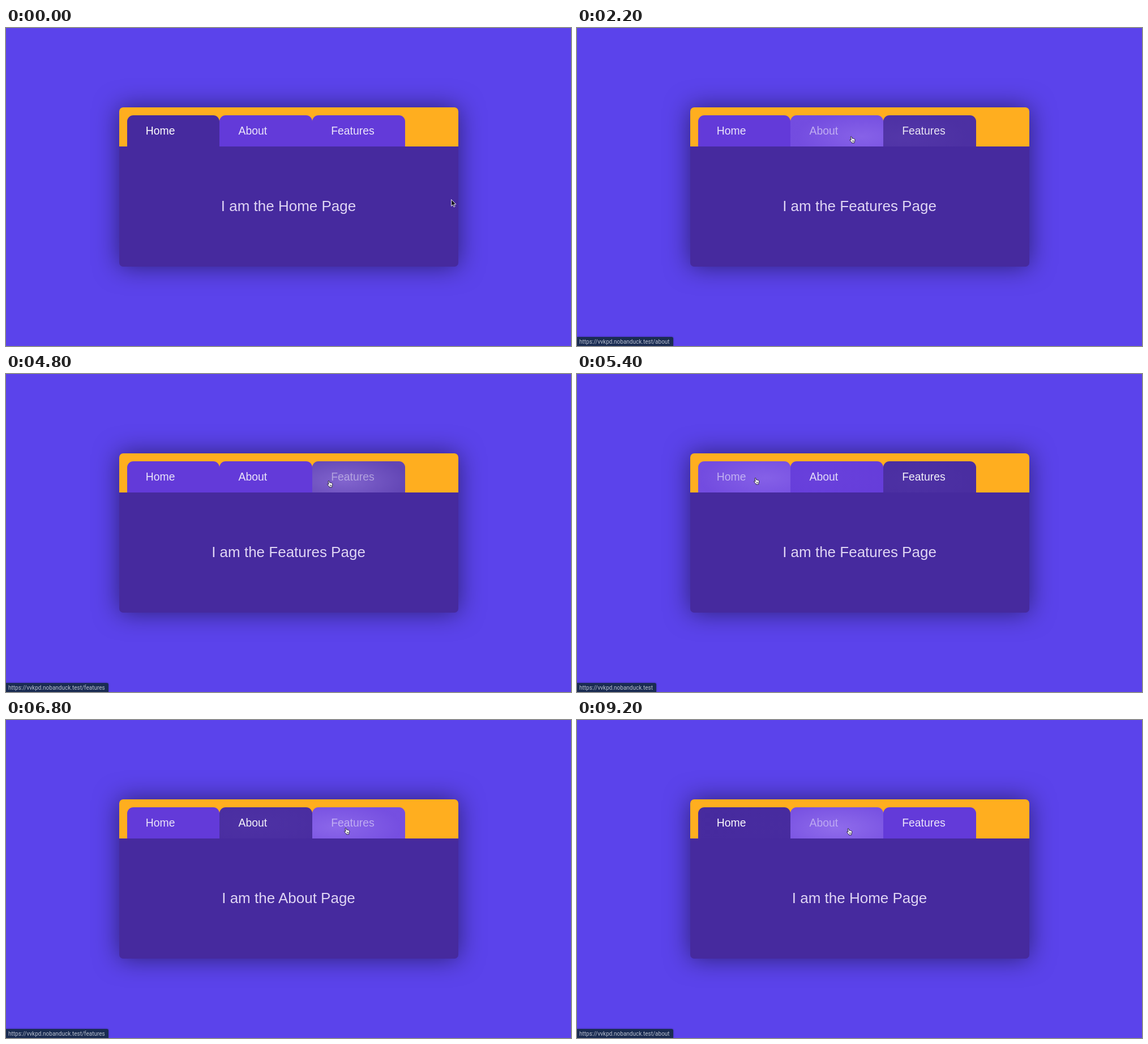
An HTML page for the animation above (10 s loop, 998 by 561 pixels).

```html
<!DOCTYPE html>
<html lang="en">
<head>
<meta charset="utf-8">
<title>Tabs</title>
<style>
  html, body { margin: 0; width: 100%; height: 100%; overflow: hidden; background: #5b43eb; }
  body { position: relative; font-family: "Liberation Sans", Arial, sans-serif; cursor: default; }
  .card {
    position: absolute; left: 199.5px; top: 140px; width: 599px; height: 280.5px;
    border-radius: 7px; background: #462a9e; box-shadow: 0 0 44px rgba(0, 0, 0, .5);
  }
  .bar { height: 68.7px; border-radius: 7px 7px 0 0; background: #ffae1f; }
  .tab {
    position: absolute; top: 14px; width: 163.7px; height: 54.7px;
    border-radius: 11px 11px 0 0; overflow: hidden; background: #633ad9;
  }
  .tab.on { background: #462a9e; }
  .glow { position: absolute; inset: 0; }
  .label { position: absolute; left: 33.2px; font-size: 19.4px; line-height: 54.7px; color: #fff; }
  .page {
    position: absolute; top: 68.7px; width: 100%; text-align: center;
    font-size: 26px; line-height: 211.8px; color: #dfd5f4;
  }
  .status {
    position: absolute; left: 0; bottom: 0; height: 16.5px; box-sizing: border-box; padding: 0 6.5px 0 4px;
    border-radius: 0 3px 0 0; background: #1a2c52; color: #b9c0cf; white-space: nowrap;
    font: 10px/17px Roboto, Arial, sans-serif; box-shadow: 0 0 3px rgba(0, 0, 0, .35);
  }
  svg { position: absolute; left: 0; top: 0; overflow: visible; }
</style>
</head>
<body>
<div class="card">
  <div class="bar"></div>
  <div class="page"></div>
</div>
<div class="status"></div>
<svg width="12" height="16">
  <path id="arrow" d="M.6 .6V12.2L3.3 9.7L5 13.7L7 12.9L5.3 9H8.9Z" fill="#15131f" stroke="#e9e6f5"/>
  <path id="hand" d="M-1 1Q0 -.5 1 1L1.8 4Q2.7 3.3 3.4 4.2Q4.4 3.6 5 4.6Q6.4 4.3 6.7 5.7Q7 8.2 5.9 9.8L5.8 11.8H1.2L1.1 10.8Q-1 8.8 -2.4 6.6Q-2.4 5.3 -1 6L.2 6.8ZM2.6 7.4V9.8M4.3 7.4V9.8"
        fill="#fff" stroke="#1b1530" stroke-width=".9" stroke-linejoin="round"/>
</svg>
<script>
const STEP = 200, LOOP = 10000, LAST = 46;
const NAMES = ["Home", "About", "Features"];
const TAB_X = 213.6, TAB_Y = 154, TAB_W = 163.7;

// Where the cursor rests and clicks: [step, x, y]
const STOPS = [
  [0, 786, 302], [4, 457, 199], [5, 455, 199], [8, 600, 193], [15, 428, 190],
  [18, 615, 189], [22, 640, 189], [24, 570, 188], [27, 315, 183], [30, 431, 182],
  [34, 600, 190], [37, 325, 188], [39, 467, 190], [41, 340, 190], [LAST, 479, 191]
];

const $ = s => document.querySelector(s);
const mix = (a, b, k) => a + (b - a) * k;
const easeOut = k => 1 - (1 - k) ** 2;

function cursorAt(n) {
  const i = Math.max(1, STOPS.findIndex(s => s[0] >= n));
  const [a, b] = [STOPS[i - 1], STOPS[i]];
  const k = easeOut((n - a[0]) / (b[0] - a[0]));
  return { x: mix(a[1], b[1], k), y: mix(a[2], b[2], k) };
}

function tabUnder({ x, y }) {
  const i = Math.floor((x - TAB_X) / TAB_W);
  return y > TAB_Y && y < 209 && i >= 0 && i < NAMES.length ? i : -1;
}

// A click shows its page one step later
function pageAt(n) {
  const stop = STOPS.filter(s => s[0] < n).pop();
  return stop ? Math.max(0, tabUnder({ x: stop[1], y: stop[2] })) : 0;
}

// Hover light fades in and out and trails the cursor
function buildStates() {
  const glow = NAMES.map(() => ({ h: 0, x: 0, y: 0 }));
  let link = -1, wide = true;
  return Array.from({ length: LAST + 1 }, (_, n) => {
    const pos = cursorAt(n), over = tabUnder(pos);
    glow.forEach((g, i) => {
      if (i === over) {
        const k = g.h < .3 ? 1 : .4;
        g.x = mix(g.x, pos.x, k);
        g.y = mix(g.y, pos.y, k);
      }
      g.h = mix(g.h, i === over ? 1 : 0, .5);
    });
    if (over >= 0 && over !== link) {
      wide = link < 0;
      link = over;
    }
    return { pos, over, link, wide, page: pageAt(n), glow: glow.map(g => ({ ...g })) };
  });
}

const tabs = NAMES.map((name, i) => {
  const tab = document.createElement("div");
  tab.className = "tab";
  tab.style.left = 14.1 + i * TAB_W + "px";
  tab.innerHTML = `<div class="glow"></div><div class="label">${name}</div>`;
  $(".card").append(tab);
  return { tab, light: tab.firstChild, label: tab.lastChild };
});

function draw(s) {
  tabs.forEach(({ tab, light, label }, i) => {
    const { h, x, y } = s.glow[i], on = i === s.page;
    tab.classList.toggle("on", on);
    light.style.opacity = h < .02 ? 0 : h;
    light.style.background = `radial-gradient(115px 44px at ${x - TAB_X - i * TAB_W}px ${y - TAB_Y}px,
      rgba(190,160,255,.5), rgba(190,160,255,.23))`;
    label.style.opacity = mix(on ? 1 : .87, .43, h);
  });
  $(".page").textContent = `I am the ${NAMES[s.page]} Page`;

  const status = $(".status"), path = s.link > 0 ? "/" + NAMES[s.link].toLowerCase() : "";
  status.style.display = s.link < 0 ? "none" : "block";
  status.style.minWidth = s.wide ? "331.5px" : "0";
  status.textContent = "https://vvkpd.nobanduck.test" + path;

  $("svg").style.transform = `translate(${s.pos.x}px, ${s.pos.y}px)`;
  $("#hand").style.display = s.over < 0 ? "none" : "";
  $("#arrow").style.display = s.over < 0 ? "" : "none";
}

const states = buildStates();
const start = performance.now();
let shown = -1;

function tick() {
  const t = (performance.now() - start) % LOOP;
  const n = Math.min(LAST, Math.floor(t / STEP));
  if (n !== shown) draw(states[shown = n]);
  requestAnimationFrame(tick);
}
tick();
</script>
</body>
</html>
```
